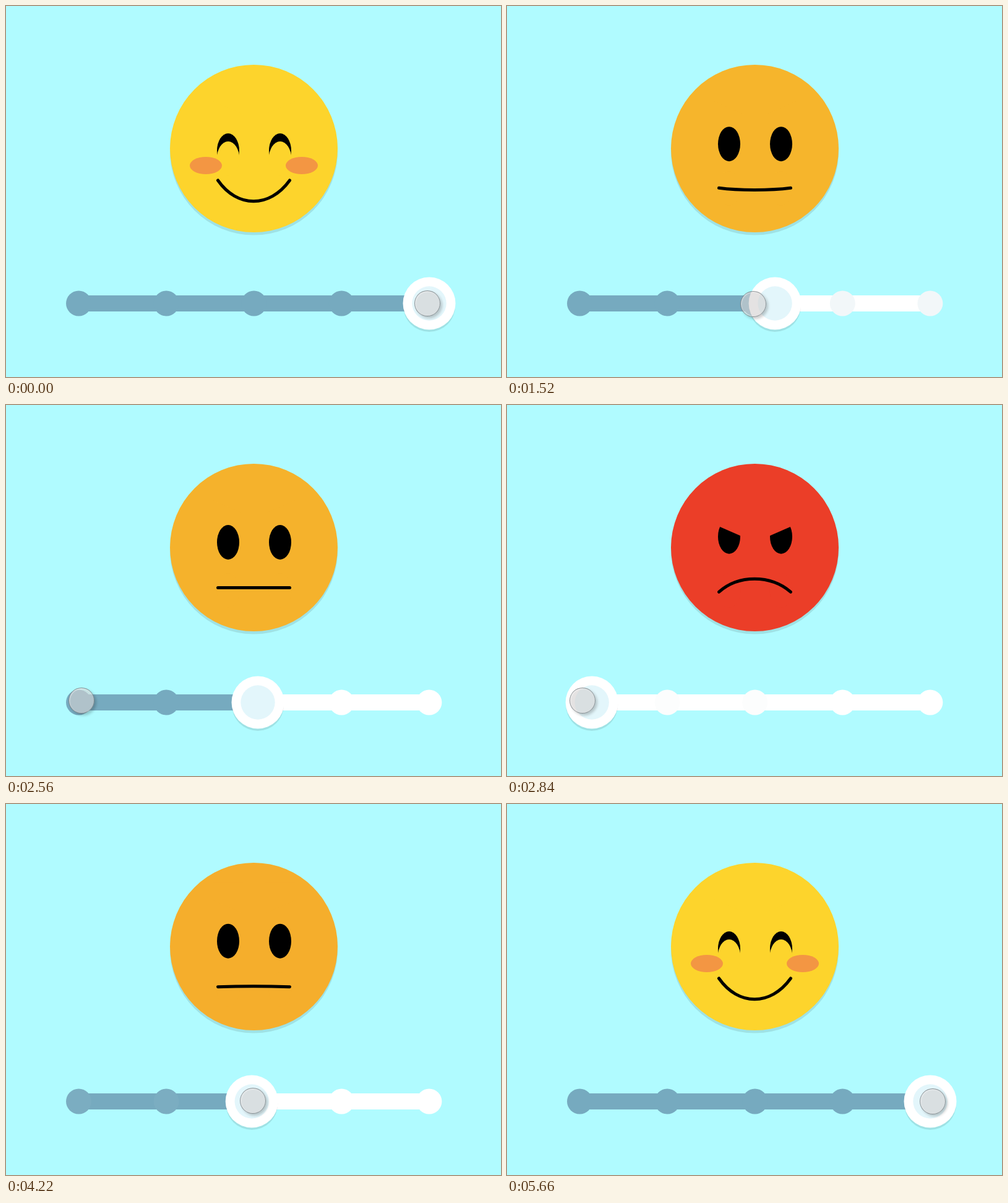
Write an HTML page that moves like this. It is 800 px wide and 600 px high and loops after 5.88 s.

```html
<!DOCTYPE html>
<html lang="en">
<head>
<meta charset="utf-8">
<title>Mood slider</title>
<style>
html, body { margin: 0; width: 100%; height: 100%; overflow: hidden; background: #b0fbff; }
svg { display: block; position: absolute; left: 0; top: 0; }
#cursor {
  position: absolute; left: -21px; top: -21px; width: 42px; height: 42px;
  box-sizing: border-box; border: 1px solid rgba(85, 95, 100, .6); border-radius: 50%;
  background: rgba(211, 209, 209, .62);
  box-shadow: 3px 3px 4px rgba(0, 0, 0, .2), inset 1px 1px 2px rgba(255, 255, 255, .5);
}
</style>
</head>
<body>
<svg width="800" height="600" viewBox="0 0 800 600">
  <circle cx="400.5" cy="235" r="135.5" opacity=".1"/>
  <circle class="skin" cx="400.5" cy="230.5" r="135.5"/>
  <g id="eyes"></g>
  <g id="cheeks" fill="#ee7550" opacity="0">
    <ellipse cx="323" cy="258" rx="26" ry="14"/>
    <ellipse cx="478" cy="258" rx="26" ry="14"/>
  </g>
  <path id="mouth" fill="none" stroke="#000" stroke-width="5" stroke-linecap="round"/>
  <path d="M117.5 481H684" stroke="#fff" stroke-width="26"/>
  <path id="fill" stroke="#76aabf" stroke-width="26"/>
  <g id="stops"></g>
  <g id="knob">
    <circle cy="485" r="42" opacity=".1"/>
    <circle cy="481" r="42.5" fill="#fff"/>
    <circle cy="481" r="27.7" fill="#e3f6fb"/>
  </g>
</svg>
<div id="cursor"></div>
<script>
const LOOP = 5880, LEFT = 130.5, MIDDLE = 407, RIGHT = 684;
const $ = id => document.getElementById(id);
const all = selector => [...document.querySelectorAll(selector)];

$('eyes').innerHTML = [[359, 1], [443, -1]].map(([x, side]) => `
  <g transform="translate(${x} 0) scale(${side} 1)">
    <ellipse class="eye" rx="18" ry="28"/>
    <ellipse class="skin lid" rx="18.3" ry="28"/>
    <path class="skin brow" d="M-24-40H24V10.5L-24-10.5Z"/>
  </g>`).join('');
$('stops').innerHTML = [0, 1, 2, 3, 4].map(i =>
  `<circle class="stop" cx="${117.5 + i * 141.6}" cy="481" r="20.5"/>`).join('');

const skins = all('.skin'), eyes = all('.eye'), lids = all('.lid');
const brows = all('.brow'), stops = all('.stop');

// Knob slides: start time, x and stop level before and after
const slides = [
  [1376, RIGHT, MIDDLE, 4, 2],
  [2644, MIDDLE, LEFT, 2, 0],
  [4037, LEFT, MIDDLE, 0, 2],
  [5147, MIDDLE, RIGHT, 2, 4]
];

// Pointer moves: start, duration, from, to, sideways sway
const moves = [
  [290, 780, [681, 481], [398, 482], 11],
  [1640, 880, [398, 482], [122, 478], 6],
  [2880, 880, [122, 478], [399, 477], 5],
  [3860, 240, [399, 477], [399, 480], 0],
  [4430, 650, [399, 480], [688, 481], 4]
];

const clamp = v => Math.max(0, Math.min(1, v));
const mix = (a, b, p) => a + (b - a) * p;
const mixColor = (a, b, p) => `rgb(${a.map((v, i) => Math.round(mix(v, b[i], p)))})`;
const latest = (list, t) => list.filter(item => item[0] <= t).pop() || list[0];

// cubic-bezier(.25, .1, .25, 1)
function ease(x) {
  let lo = 0, hi = 1;
  const curve = (u, a, b) => 3 * u * (1 - u) * ((1 - u) * a + u * b) + u ** 3;
  for (let i = 0; i < 20; i++) {
    const mid = (lo + hi) / 2;
    if (curve(mid, .25, .25) < x) lo = mid; else hi = mid;
  }
  return curve(lo, .1, 1);
}

function drawFace(mood) {
  const joy = Math.max(0, mood), anger = Math.max(0, -mood);
  const pose = (calm, happy, angry) => calm + (happy - calm) * joy + (angry - calm) * anger;
  const skin = mixColor([245, 178, 44], joy ? [253, 212, 44] : [235, 59, 40], joy + anger);
  skins.forEach(e => e.setAttribute('fill', skin));
  eyes.forEach(e => e.setAttribute('cy', pose(222, 234, 212.5)));
  lids.forEach(e => e.setAttribute('cy', pose(300, 247, 300)));
  brows.forEach(e => e.setAttribute('transform', `translate(0 ${pose(165, 165, 204.5)})`));
  $('cheeks').setAttribute('opacity', .65 * clamp((joy - .1) / .9));
  const end = pose(295.5, 282, 302.5), bend = pose(295.5, 327, 273.7);
  $('mouth').setAttribute('d', `M342.5 ${end}C374 ${bend} 426 ${bend} 458.5 ${end}`);
}

function drawSlider(t) {
  const [start, from, to, before, after] = latest(slides, t);
  const p = 1 - (1 - clamp((t - start) / 325)) ** 4;
  const x = mix(from, to, p);
  $('fill').setAttribute('d', `M117.5 481H${x}`);
  $('knob').setAttribute('transform', `translate(${x} 0)`);
  const on = (i, level) => level && i <= level ? 1 : 0;
  stops.forEach((e, i) => e.setAttribute('fill',
    mixColor([255, 255, 255], [118, 170, 191], mix(on(i, before), on(i, after), p))));
  drawFace((x - MIDDLE) / (x < MIDDLE ? MIDDLE - LEFT : RIGHT - MIDDLE));
}

function drawCursor(t) {
  const [start, time, from, to, sway] = latest(moves, t);
  const p = ease(clamp((t - start) / time));
  const x = mix(from[0], to[0], p);
  const y = mix(from[1], to[1], p) + sway * Math.sin(p * 2 * Math.PI);
  $('cursor').style.transform = `translate(${x}px, ${y}px)`;
}

function frame(now) {
  const t = now % LOOP;
  drawSlider(t);
  drawCursor(t);
  requestAnimationFrame(frame);
}
frame(0);
</script>
</body>
</html>
```
